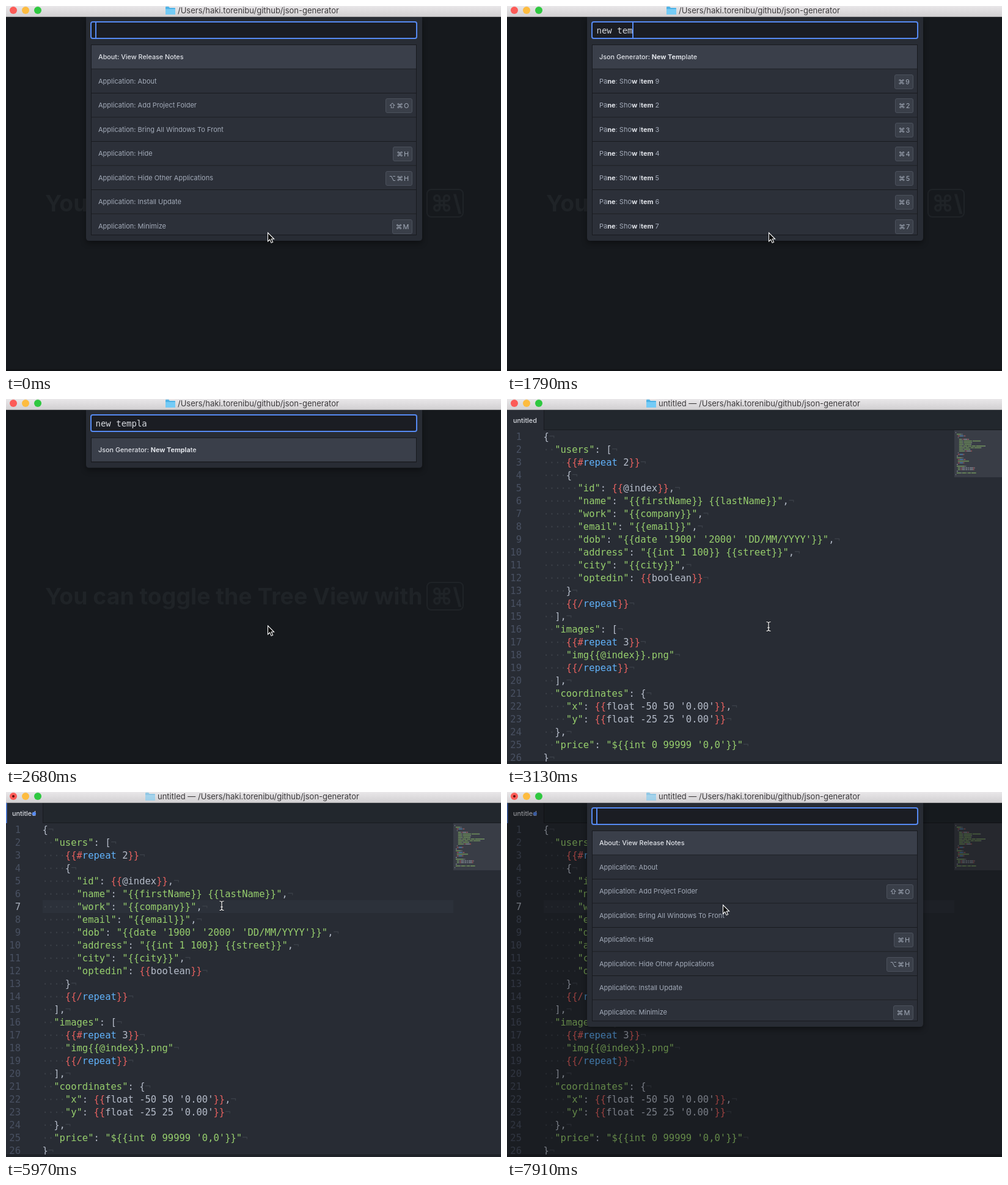
These frames come from a looping animation (810x597 px, 8 s). An HTML page:

```html
<!DOCTYPE html>
<html lang="en">
<head>
<meta charset="utf-8">
<title>Command palette</title>
<style>
  html, body { margin: 0; width: 100%; height: 100%; overflow: hidden; background: #16191d; }
  svg { display: block; position: absolute; left: 0; top: 0; }
  text { font-family: Inter, "DejaVu Sans", sans-serif; font-size: 11px; }
  .title { font-size: 13px; fill: #3c3a3c; }
  .hint { font-size: 37.4px; font-weight: 700; fill: #1f2327; }
  .code, .num { font-family: "DejaVu Sans Mono", monospace; font-size: 15.5px; fill: #b4bbc8; }
  .num { fill: #495162; text-anchor: end; }
  .num.on { fill: #abb2bf; }
  .ws { fill: #3b4048; }
  .query { font-family: "DejaVu Sans Mono", monospace; font-size: 14px; fill: #d7dae0; }
  .item { fill: #a3abb9; }
  .item.on { fill: #dfe2e8; font-weight: 500; font-size: 10.8px; }
  .item .hit { fill: #dfe2e8; font-weight: 700; }
  .key { fill: #a3abb9; text-anchor: middle; letter-spacing: 1px; }
  .panel { filter: drop-shadow(0 4px 5px rgba(0, 0, 0, .4)); }
</style>
</head>
<body>
<svg id="stage" width="810" height="597" viewBox="0 0 810 597"></svg>
<script>
const LOOP = 8000;
const PATH = '/Users/haki.torenibu/github/json-generator';
const BLUE = '#568af2', RED = '#e6615f', GREEN = '#97cf6d', SKY = '#61b2fa', GREY = '#b4bbc8', EDGE = '#181a1f';

const source = `{
  "users": [
    {{#repeat 2}}
    {
      "id": {{@index}},
      "name": "{{firstName}} {{lastName}}",
      "work": "{{company}}",
      "email": "{{email}}",
      "dob": "{{date '1900' '2000' 'DD/MM/YYYY'}}",
      "address": "{{int 1 100}} {{street}}",
      "city": "{{city}}",
      "optedin": {{boolean}}
    }
    {{/repeat}}
  ],
  "images": [
    {{#repeat 3}}
    "img{{@index}}.png"
    {{/repeat}}
  ],
  "coordinates": {
    "x": {{float -50 50 '0.00'}},
    "y": {{float -25 25 '0.00'}}
  },
  "price": "\${{int 0 99999 '0,0'}}"
}`.split('\n');

const commands = [
  ['About: View Release Notes'],
  ['Application: About'],
  ['Application: Add Project Folder', '⇧⌘O', 44],
  ['Application: Bring All Windows To Front'],
  ['Application: Hide', '⌘H', 32],
  ['Application: Hide Other Applications', '⌥⌘H', 44],
  ['Application: Install Update'],
  ['Application: Minimize', '⌘M', 33]
];
const matches = [
  ['Application: New File', '⌘N', 32],
  ['Application: New Window', '⇧⌘N', 44],
  ['Json Generator: New Template'],
  ...[9, 2, 3, 4, 5, 6, 7].map(n => ['Pane: Show Item ' + n, '⌘' + n, n === 9 ? 31 : 30])
];

// Each step overrides part of the state from its time on.
const type = (text, from, to, start) =>
  Array.from({ length: to - from }, (_, i) => [start + 150 * i, { query: text.slice(0, from + i + 1), caret: 1 }]);
const steps = [
  [0, { query: '', caret: 1, code: 0, dirty: 0, row: 0, dim: 0, beam: 0, mouse: [428, 370] }],
  [150, { caret: 0 }],
  [450, { caret: 1 }],
  ...type('new tem', 0, 7, 890),
  ...type('new templa', 7, 10, 2090),
  [2680, { caret: 0 }],
  [3130, { query: null, code: 1, beam: 1, mouse: [428, 372] }],
  [3280, { dirty: 1 }],
  [3730, { mouse: [435, 364] }],
  [3880, { mouse: [408, 292] }],
  [4030, { mouse: [368, 208] }],
  [4170, { mouse: [353, 186] }],
  [4620, { row: 7, caret: 1 }],
  [5220, { caret: 0 }],
  [5520, { caret: 1 }],
  [5970, { caret: 0 }],
  [6410, { query: '', caret: 1, dim: .2, beam: 0, mouse: [353, 184] }],
  [6560, { dim: .3 }],
  [6710, { dim: .34, caret: 0 }],
  [7160, { caret: 1 }],
  [7610, { caret: 0 }],
  [7910, { caret: 1 }]
];

const nb = s => s.replace(/ /g, '\u00a0');
const rect = (x, y, w, h, fill, more = '') =>
  `<rect x="${x}" y="${y}" width="${w}" height="${h}" fill="${fill}" ${more}/>`;
const text = (cls, x, y, s) => `<text class="${cls}" x="${x}" y="${y}">${s}</text>`;
const circle = (x, y, r, fill) => `<circle cx="${x}" cy="${y}" r="${r}" fill="${fill}"/>`;

function tokens(line) {
  return line.split(/("[^"]*"|\{\{[#\/]?|\}\}|repeat)/).filter(Boolean).map(s => [s,
    s[0] === '"' ? GREEN : /^(\{\{|\}\})/.test(s) ? RED : s === 'repeat' ? SKY : GREY]);
}

function titleBar({ code, dirty }) {
  const x = code ? 228 : 261;
  return rect(0, 0, 810, 17, 'url(#bar)') + rect(0, 17, 810, 1, '#a9a8a9') +
    circle(12, 7, 6, '#fc5b57') + circle(32, 7, 6, '#fdbc40') + circle(52, 7, 6, '#2fc840') +
    (dirty ? circle(12, 7, 2, '#5a0d0b') : '') +
    `<g opacity="${dirty ? .55 : 1}"><path d="M${x} 2q0-1 1-1h4l2 2h8q1 0 1 1v10h-16z" fill="#4fb3e6"/>` +
    rect(x, 5, 16, 9, '#74cbf6') + '</g>' +
    text('title', x + 20, 12, nb((code ? 'untitled — ' : '') + PATH));
}

function emptyPane() {
  return rect(0, 18, 810, 579, '#16191d') +
    text('hint', 64, 336, nb('You can toggle the Tree View with')) +
    rect(689, 300, 59, 45, 'none', 'rx="7" stroke="#1f2327" stroke-width="2"') +
    text('hint', 695, 336, '⌘\\') +
    rect(0, 594, 810, 3, '#111316');
}

function codeLine(line, i) {
  const indent = line.search(/\S/);
  let map = '', spans = '', col = indent;
  for (const [s, color] of tokens(line.trim())) {
    spans += `<tspan fill="${color}">${nb(s)}</tspan>`;
    for (const word of s.matchAll(/\S+/g))
      map += rect(734 + (col + word.index) * .96, 54 + i * 2.75, word[0].length * .96, 1.8, color, 'opacity=".5"');
    col += s.length;
  }
  const dots = `<tspan class="ws">${'·'.repeat(indent)}</tspan>`;
  return [text('code', 59.5, 67 + 21 * i, dots + spans + '<tspan class="ws">¬</tspan>'), map];
}
const codeLines = source.map(codeLine);

function editor({ dirty, row, caret, query, dim }) {
  const top = 51 + 21 * (row - 1);
  return rect(0, 18, 810, 579, '#282c34') +
    rect(60, 18, 750, 33, '#22272d') + rect(60, 50, 750, 1, EDGE) + rect(60, 18, 1, 33, EDGE) +
    `<text x="10" y="39" fill="#d7dae0" font-weight="500" style="font-size:10.8px">untitled</text>` +
    (dirty ? rect(0, 18, 1.5, 33, BLUE) + circle(46, 35.5, 3, BLUE) : '') +
    (row ? rect(60, top, 672, 21, '#2c313a') : '') +
    source.map((_, i) => text(i + 1 === row ? 'num on' : 'num', 24, 67 + 21 * i, i + 1)).join('') +
    codeLines.map(l => l[0]).join('') +
    rect(732, 51, 78, 77, '#393d46') + codeLines.map(l => l[1]).join('') +
    (row && caret && query === null ? rect(320, top, 2, 21, '#528bff') : '') +
    rect(0, 593, 810, 1, EDGE) + rect(0, 594, 810, 3, '#21252b') +
    (dim ? rect(0, 18, 810, 579, '#000', `opacity="${dim}"`) : '');
}

// Positions hit by the query: a whole run if there is one, else the first fitting letters.
function hits(name, query) {
  const low = name.toLowerCase(), run = low.indexOf(query);
  if (run >= 0) return [...query].map((_, i) => run + i);
  const found = [];
  let at = -1;
  for (const c of query) {
    at = low.indexOf(c, at + 1);
    if (at < 0) return null;
    found.push(at);
  }
  return found;
}

function label(name, found) {
  let out = '', last = false;
  [...name].forEach((c, i) => {
    const hit = found.includes(i);
    if (hit !== last) out += hit ? '<tspan class="hit">' : '</tspan>';
    out += nb(c);
    last = hit;
  });
  return out + (last ? '</tspan>' : '');
}

function palette({ query, caret }) {
  const items = query ? matches.filter(m => hits(m[0], query)).slice(0, 8) : commands;
  const height = Math.min(312, items.length * 39.5 + 1);
  const rows = items.map(([name, key, width], i) => {
    const y = 64 + 39.5 * i;
    return rect(140, y, 531, 39, i ? '#2c3039' : '#3a3f4a') + rect(139, y + 38.5, 533, 1, EDGE) +
      text(i ? 'item' : 'item on', 151, Math.round(y + 23), label(name, hits(name, query))) +
      (key ? rect(665.5 - width, Math.round(y + 8) + .5, width - 1, 23, '#3a3f49', 'rx="2.5" stroke="#4b515c"') +
        text('key', 665.5 - width / 2, Math.round(y + 24), key) : '');
  }).join('');
  return `<g class="panel"><path d="M131 18h550v${height + 49}q0 5-5 5h-540q-5 0-5-5z" fill="#282c34"/></g>` +
    rect(139, 26, 533, 27, '#1b1d23', `rx="3" stroke="${BLUE}" stroke-width="2"`) +
    text('query', 146.5, 45, nb(query)) +
    (caret ? rect(146 + Math.round(query.length * 8.43), 27, 2, 25, BLUE) : '') +
    `<clipPath id="list">${rect(139, 63, 533, height, '#000')}</clipPath><g clip-path="url(#list)">${rows}</g>` +
    rect(139.5, 63.5, 532, height - 1, 'none', `stroke="${EDGE}"`);
}

function pointer({ beam, mouse: [x, y] }) {
  const bar = 'M-3.5-7.5q3.5 0 3.5 2.5v10q0 2.5-3.5 2.5M3.5-7.5q-3.5 0-3.5 2.5v10q0 2.5 3.5 2.5M-2 2h4';
  const arrow = 'M.5.8V15l3.2-3 2.4 5.4 2.5-1.1-2.4-5.3h4.4z';
  return `<g transform="translate(${x} ${y})" fill="none">` + (beam
    ? `<path d="${bar}" stroke="#15171b" stroke-width="2.6"/><path d="${bar}" stroke="#fff" stroke-width="1.2"/>`
    : `<path d="${arrow}" fill="#000" stroke="#fff" stroke-width="1.1"/>`) + '</g>';
}

const defs = '<defs><linearGradient id="bar" x2="0" y2="1"><stop stop-color="#e9e7e9"/>' +
  '<stop offset="1" stop-color="#d2d0d2"/></linearGradient></defs>';
const stage = document.getElementById('stage');
let shown = -1;

function draw() {
  const t = performance.now() % LOOP;
  const past = steps.filter(s => s[0] <= t);
  if (past.length !== shown) {
    shown = past.length;
    const state = Object.assign({}, ...past.map(s => s[1]));
    stage.innerHTML = defs + (state.code ? editor(state) : emptyPane()) +
      (state.query === null ? '' : palette(state)) + titleBar(state) + pointer(state);
  }
  requestAnimationFrame(draw);
}
draw();
</script>
</body>
</html>
```
